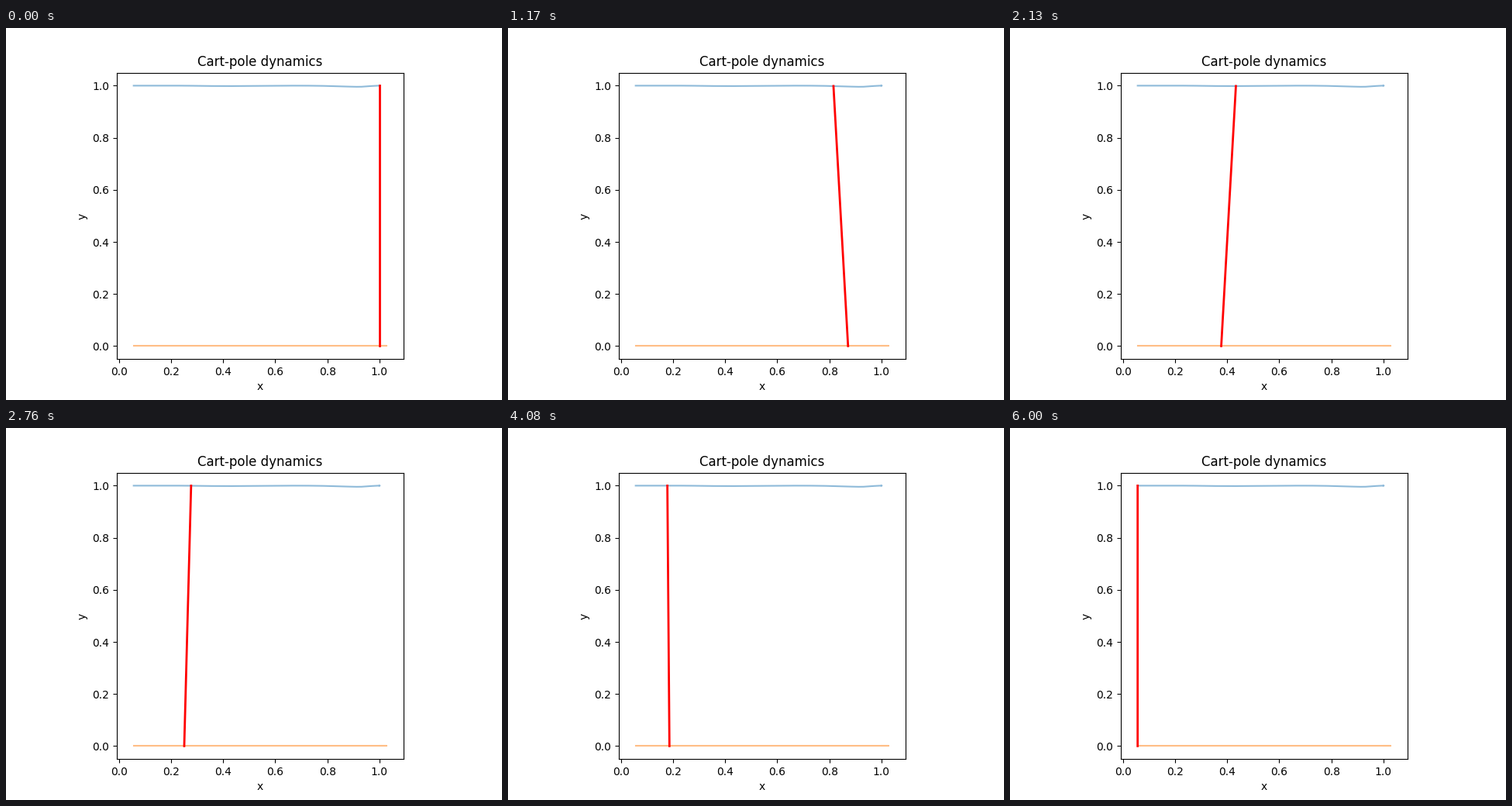
Write a matplotlib script that moves like this. It is 640 by 480 pixels and loops after 6030 ms.

```python
import numpy as np
import matplotlib.pyplot as plt
from matplotlib.animation import FuncAnimation

FRAMES, STEP = 201, 30
SWING = 2.2  # angular speed of the damped swing, rad/s


def response(t, start, drift, swing, phase, settle):
    """Closed-loop motion: slow drift, damped swing and a quick settling mode.

    drift, swing and settle hold decay rates; the settling mode is scaled
    so that the motion begins at start.
    """
    def slow(t):
        (a, ra), (b, rb) = drift, swing
        return a * np.exp(-ra * t) + b * np.exp(-rb * t) * np.sin(SWING * t + phase)

    return slow(t) + (start - slow(0)) * np.exp(-settle * t)


t = np.arange(FRAMES) * STEP / 1000
tip = response(t, 1, drift=(1.31, .514), swing=(.225, .62), phase=-1.46, settle=6.5)
lean = response(t, 0, drift=(.033, .55), swing=(-.18, .6), phase=-.38, settle=4)
cart = tip - lean
height = np.sqrt(1 - lean ** 2)  # pole of unit length

fig, ax = plt.subplots(figsize=(6.4, 4.8), dpi=100)
ax.set_aspect("equal")
ax.set_xlim(-.008, 1.092)
ax.set_ylim(-.05, 1.05)
ax.set_title("Cart-pole dynamics")
ax.set_xlabel("x")
ax.set_ylabel("y")

ax.plot(tip, height, alpha=.5)
ax.plot(cart, np.zeros(FRAMES), alpha=.5)
pole, = ax.plot([], [], "r-", lw=2)


def draw(i):
    pole.set_data([cart[i], tip[i]], [0, height[i]])
    return pole,


anim = FuncAnimation(fig, draw, frames=FRAMES, interval=STEP, repeat=True)
plt.show()
```
